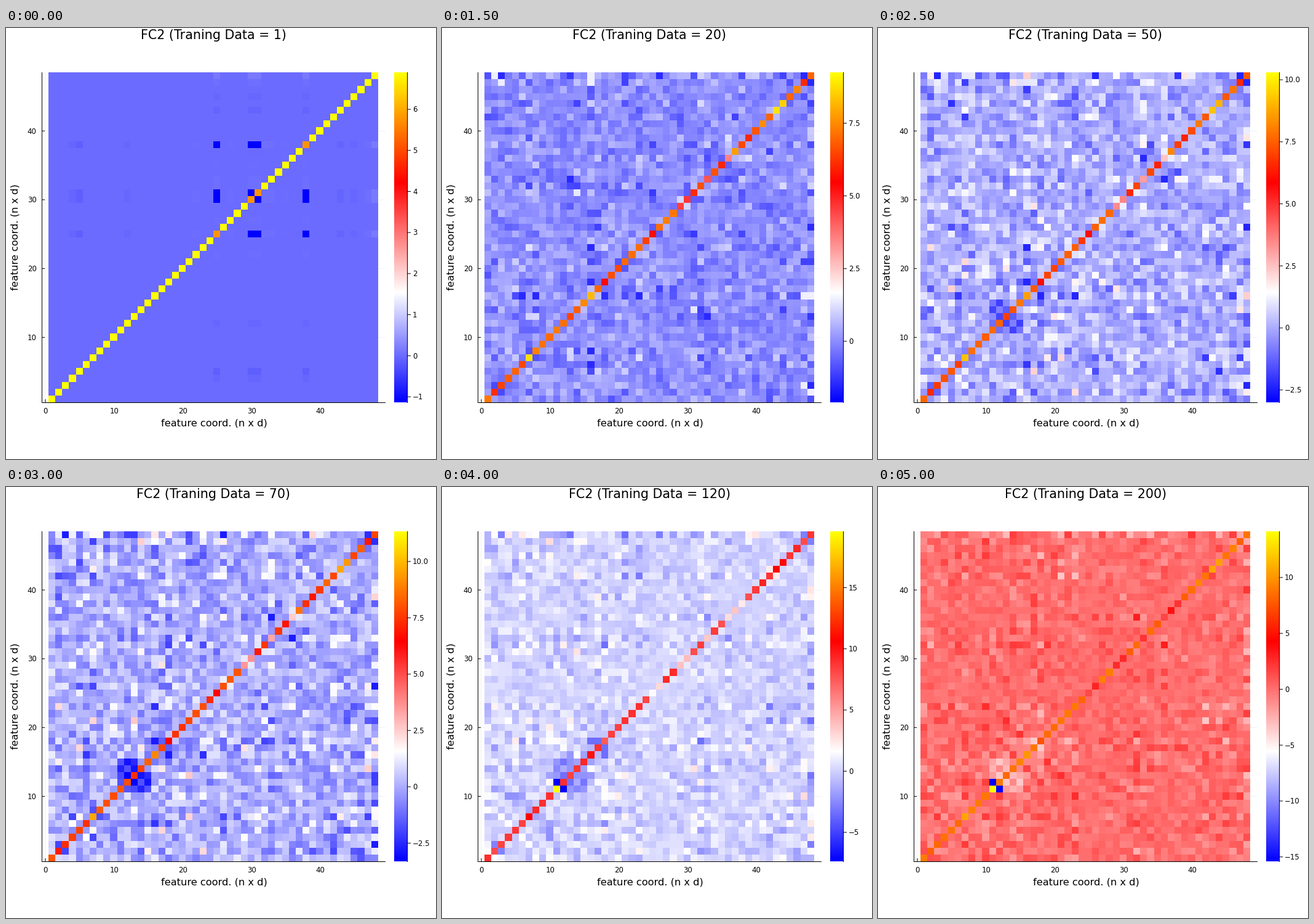
Write a matplotlib script that moves like this. It is 699 px wide and 700 px high and loops after 5.5 s.

```python
import numpy as np
import matplotlib.pyplot as plt
from matplotlib.animation import FuncAnimation
from matplotlib.colors import LinearSegmentedColormap

W, H, DPI = 699, 700, 100
PX = 72 / DPI
N = 48
X0, Y0, CELL = 64.0, 614.2, 11.175
TOP, BOT = 72, 608

# training samples per step and the colour range reached there
COUNTS = [1, 5, 10, 20, 30, 50, 70, 100, 120, 150, 200]
LOW = [-1.135, -1.35, -1.57, -2.1, -2.65, -3.0, -3.31, -4.3, -7.37, -12.65, -15.4]
HIGH = [6.9, 8.1, 9.09, 9.25, 9.44, 10.3, 11.34, 13.6, 19.6, 13.69, 14.13]

# groups of coordinates that behave alike
MOVED = [25, 30, 31, 38]
STIFF = [7, 16, 43, 44]
SOFT = [18, 25, 31, 47]
WEAK = [29, 30, 33, 36]
LOOSE = [25, 26, 37, 38]
EARLY_LOUD = [7, 8, 12, 16, 29, 44, 47, 48]
LATE_LOUD = [10, 11, 12, 15, 18, 48]


def members(*groups):
    """0/1 vector marking the coordinates (counted from 1) in the groups."""
    v = np.zeros(N)
    for g in groups:
        v[np.array(g) - 1] = 1
    return v


def sym_noise(rng):
    a = np.triu(rng.standard_normal((N, N)), 1)
    return a + a.T


def build():
    rng = np.random.default_rng(12)
    faint = rng.normal(0, .07, N) * (rng.random(N) < .4)
    moved = members(MOVED)
    first = np.where(moved > 0, 1.063, faint)
    first = np.outer(first, first) * np.maximum.outer(moved, moved)
    loud = rng.uniform(.6, 1.1, N)
    offset = rng.normal(0, .4, N) + 1.7 * members(STIFF) - 1.2 * members(SOFT)
    block = np.outer(members(range(11, 16)), members(range(11, 16)))

    grain, prev, out = sym_noise(rng), 1, []
    for n, lo, hi in zip(COUNTS, LOW, HIGH):
        keep = np.sqrt(prev / n)
        grain = keep * grain + np.sqrt(1 - keep ** 2) * sym_noise(rng)
        prev = n

        late = np.interp(n, [10, 120], [0, 1])
        freed = members(LOOSE) * (n >= 120)
        amp = loud * (1 + .5 * (1 - late) * members(EARLY_LOUD)
                      + .5 * late * members(LATE_LOUD)) * (1 - .5 * freed)
        sigma = min(.11 * np.sqrt(n), 1.15) * (n > 1)
        m = np.clip(sigma * np.outer(amp, amp) * grain, -3 * sigma, 3 * sigma)
        m -= first * np.interp(n, [1, 100], [1, 0])
        m -= block * np.interp(n, [20, 70], [0, 2])

        mean = np.interp(n, [1, 30, 120], [6.9, 7.0, 8.8])
        diag = mean + offset * np.interp(n, [1, 10], [0, 1])
        diag -= members(WEAK) * np.interp(n, [1, 10, 30, 200], [0, 1.5, 4, 6.5])
        diag -= freed * 6
        np.fill_diagonal(m, diag - (first.diagonal() if n == 1 else 0))
        if n >= 120:
            m[10, 11] = m[11, 10] = lo
            m[10, 10] = hi
        out.append(np.clip((m - lo) / (hi - lo), 0, 1))
    return out


maps = build()
cmap = LinearSegmentedColormap.from_list("bwry", ["blue", "white", "red", "yellow"], N=768)

plt.rcParams["font.family"] = "DejaVu Sans"
fig = plt.figure(figsize=(W / DPI, H / DPI), dpi=DPI, facecolor="white")
ax = fig.add_axes([0, 0, 1, 1])
ax.axis("off")


def line(xs, ys, **kw):
    style = dict(color="black", lw=PX, solid_capstyle="butt", snap=False, zorder=4)
    return ax.plot(xs, ys, **{**style, **kw})[0]


def text(x, y, s, px, ha="center", va="baseline", **kw):
    return ax.text(x, y, s, fontsize=px * PX, ha=ha, va=va, **kw)


def image(data, left, right):
    # the slight shift settles cell edges that fall on half pixels
    e = .05
    return ax.imshow(data, cmap=cmap, vmin=0, vmax=1, origin="lower", aspect="auto",
                     interpolation="nearest", zorder=2,
                     extent=(left + e, right + e, BOT - e, TOP - e))


GRID = dict(alpha=.1, lw=.5 * PX, zorder=1)
for t in range(0, 50, 10):
    x, y = X0 + CELL * t, Y0 - CELL * t
    line([x, x], [TOP, BOT], **GRID)
    line([x, x], [603, 609], zorder=1)
    text(x, 626, str(t), 11.8)
    if t:
        line([58, 617], [y, y], **GRID)
        line([58, 63], [y, y], zorder=1)
        text(49.5, y + 4.3, str(t), 11.8, ha="right")

heat = image(maps[0], 69, 605)
image(np.linspace(0, 1, BOT - TOP)[:, None], 631, 652)
line([58.5, 58.5], [TOP, 609])
line([58, 617], [608.5, 608.5])
line([652.5, 652.5], [TOP, 609])

title = text(337.5, 18, "", 20.65)
LABEL = "feature coord. (n x d)"
text(338, 646.5, LABEL, 16.3)
text(22.5, 340, LABEL, 16.3, ha="right", va="center", rotation=90)

marks = [(line([652, 658], [0, 0]), text(661, 0, "", 11.8, ha="left"))
         for _ in range(10)]
ax.set_xlim(0, W)
ax.set_ylim(H, 0)


def tick_step(span):
    return 1 if span < 9 else 2.5 if span < 18 else 5


def tick_label(v, step):
    s = f"{v:.1f}" if step == 2.5 and v else f"{abs(v) if v == 0 else v:.0f}"
    return s.replace("-", "\u2212")


def update(k):
    lo, hi = LOW[k], HIGH[k]
    heat.set_data(maps[k])
    title.set_text(f"FC2 (Traning Data = {COUNTS[k]})")
    step = tick_step(hi - lo)
    ticks = np.arange(np.ceil(lo / step), np.floor(hi / step) + 1) * step
    for i, (mark, label) in enumerate(marks):
        shown = i < len(ticks)
        mark.set_visible(shown)
        label.set_visible(shown)
        if shown:
            y = BOT - (ticks[i] - lo) / (hi - lo) * (BOT - TOP)
            mark.set_ydata([y, y])
            label.set_y(y + 4.3)
            label.set_text(tick_label(ticks[i], step))
    return []


anim = FuncAnimation(fig, update, frames=len(COUNTS), interval=500,
                     repeat=True, repeat_delay=0, blit=False)
plt.show()
```
